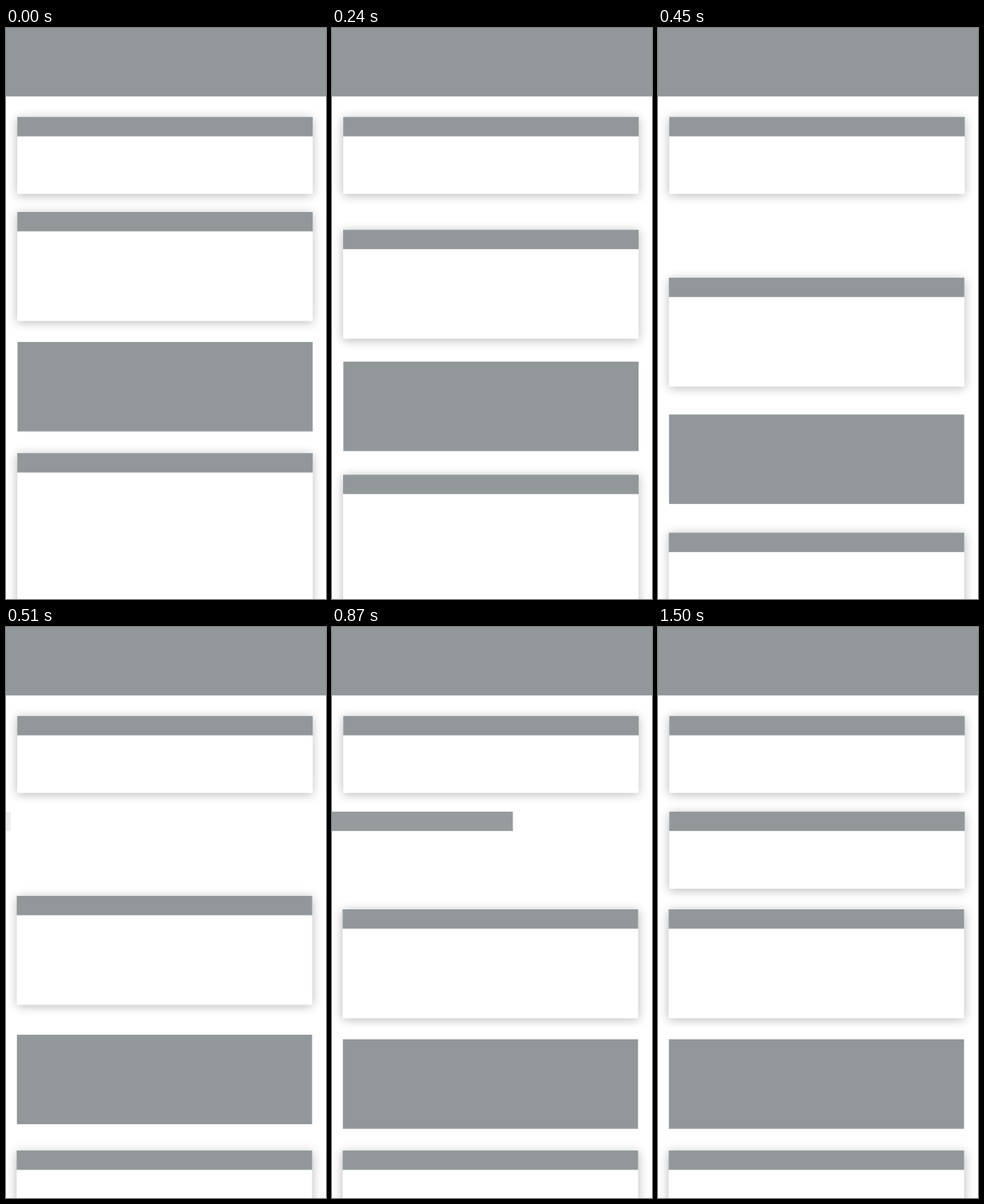
An HTML page with a canvas that plays this animation: 404 px wide and 720 px high, repeating every 1.53 s.

```html
<!DOCTYPE html>
<html lang="en">
<head>
<meta charset="utf-8">
<title>Card insertion</title>
<style>
  html, body { margin: 0; width: 100%; height: 100%; overflow: hidden; background: #fff; }
  canvas { display: block; }
</style>
</head>
<body>
<canvas id="stage" width="404" height="720"></canvas>
<script>
const ctx = document.getElementById('stage').getContext('2d');
const LOOP = 1530, STEP = 30;
const GREY = '#929799';
const LEFT = 14.2, WIDTH = 373.1, HEADER = 24.4;
const DROP = 124, DRIFT = -0.8;

const clamp = v => Math.min(1, Math.max(0, v));
const linear = (t, start, duration) => clamp((t - start) / duration);
const easeIn = (t, start, duration) => linear(t, start, duration) ** 2;

function rect(x, y, w, h, color) {
  ctx.fillStyle = color;
  ctx.fillRect(x, y, w, h);
}

function panel(x, y, h, strength = 1) {
  ctx.save();
  ctx.shadowColor = `rgba(0, 0, 0, ${0.28 * strength})`;
  ctx.shadowBlur = 12;
  ctx.shadowOffsetY = 2;
  rect(x, y, WIDTH, h, '#fff');
  ctx.restore();
}

function card(x, y, h) {
  panel(x, y, h);
  rect(x, y, WIDTH, HEADER, GREY);
}

function newCard(t) {
  const y = 232.8;
  const shade = linear(t, 960, 300);
  if (shade > 0) panel(LEFT, y, 97.2, shade);
  const slide = easeIn(t, 440, 560);
  ctx.globalAlpha = linear(t, 440, 450);
  rect(LEFT - (LEFT + WIDTH) * (1 - slide), y, WIDTH, HEADER, GREY);
  ctx.globalAlpha = 1;
}

function draw(t) {
  rect(0, 0, 404, 720, '#fff');
  rect(0, 0, 404, 86.3, GREY);
  card(LEFT, 112.2, 97);
  newCard(t);

  // Lower items share one acceleration curve and land one after another.
  const fall = duration => easeIn(t, 12, duration);
  const middle = fall(536), block = fall(510), bottom = fall(487);
  card(LEFT + DRIFT * middle, 232 + DROP * middle, 137.4);
  rect(LEFT + 0.3 + DRIFT * block, 395.9 + DROP * block, WIDTH - 0.4, 112.8, GREY);
  card(LEFT + DRIFT * bottom, 536.1 + DROP * bottom, 260);
}

function frame() {
  const t = performance.now() % LOOP;
  draw(Math.floor(t / STEP) * STEP);
  requestAnimationFrame(frame);
}
frame();
</script>
</body>
</html>
```
